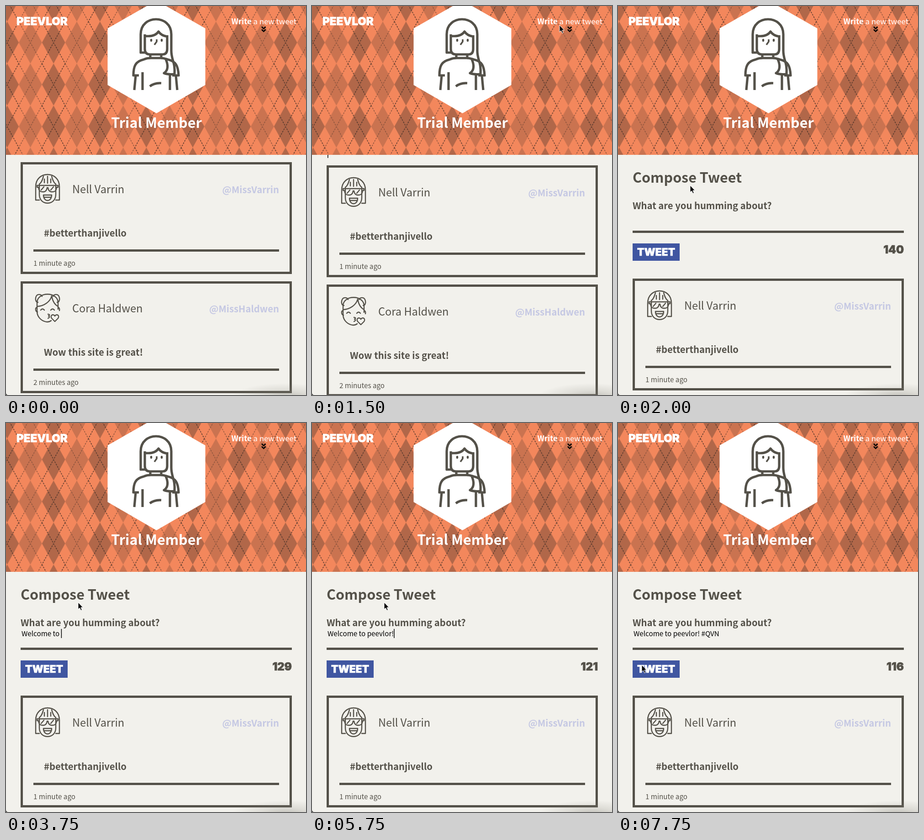
Animation, 657 px wide and 852 px high, one loop 8 s. Source, as an HTML page:

```html
<!DOCTYPE html>
<html lang="en">
<head>
<meta charset="utf-8">
<title>Compose</title>
<style>
  html, body { margin: 0; width: 100%; height: 100%; overflow: hidden; background: #f2f1ec; }
  #stage { display: block; width: 657px; height: 852px; }
  text { font-family: "Noto Sans CJK JP", "Noto Sans CJK SC", "Noto Sans CJK", "Open Sans", sans-serif; fill: #545149; white-space: pre; }
  .light { font-weight: 300; }
  .bold { font-weight: 600; }
  .h1 { font-size: 30.5px; }
  .h2 { font-size: 23.6px; }
  .h3 { font-size: 20.3px; }
  .nav { font-size: 16.8px; }
  .small { font-size: 15.2px; }
  .white { fill: #fff; }
  .handle { fill: #c5c8e3; font-weight: 700; }
  .block { font-family: Inter, Lato, sans-serif; font-weight: 900; stroke: #545149; stroke-width: .7; }
  .block.white { stroke: #fff; }
  .end { text-anchor: end; }
  .mid { text-anchor: middle; }
  .ink { fill: none; stroke: #545149; stroke-linecap: round; stroke-linejoin: round; }
</style>
</head>
<body>
<svg id="stage" viewBox="0 0 657 852">
  <defs>
    <pattern id="argyle" x="2.6" y="34" width="101.6" height="92" patternUnits="userSpaceOnUse" viewBox="0 0 96 92" preserveAspectRatio="none">
      <rect width="96" height="92" fill="#f3875c"/>
      <path d="M48 0L72 46L48 92L24 46Z" fill="#ca7350"/>
      <path d="M0 0L24 46L0 92ZM96 0V92L72 46Z" fill="#b16749"/>
      <g fill="none" stroke-width="1.2" stroke-dasharray="3.4 2.3">
        <path d="M24 0L72 92M72 0L24 92" stroke="#7d4c38"/>
        <path d="M-24 0L24 92M24 0L-24 92M72 0L120 92M120 0L72 92" stroke="#3c2b24"/>
      </g>
    </pattern>
    <radialGradient id="shade">
      <stop offset="0" stop-color="#77756c" stop-opacity=".42"/>
      <stop offset=".5" stop-color="#88867c" stop-opacity=".18"/>
      <stop offset="1" stop-color="#88867c" stop-opacity="0"/>
    </radialGradient>
  </defs>
  <rect width="657" height="852" fill="#f2f1ec"/>

  <g id="feed"></g>

  <svg id="composer" y="326" width="657" height="0" overflow="hidden">
    <g id="form">
      <text x="32" y="387" class="h1 bold">Compose Tweet</text>
      <text x="32" y="445" class="h3 bold">What are you humming about?</text>
      <text id="draft" x="34" y="467" class="small light" style="fill:#000"></text>
      <rect id="caret" y="451" width="1.5" height="20"/>
      <rect x="32" y="492" width="594" height="5" fill="#545149"/>
      <rect x="32" y="520" width="103" height="38" fill="#4056a1"/>
      <text x="83.5" y="547" class="block white mid" font-size="22.5">TWEET</text>
      <text id="count" x="626" y="542" class="block end" font-size="24"></text>
    </g>
  </svg>

  <rect width="657" height="326" fill="url(#argyle)"/>
  <path d="M329.5 -12L436.5 49V173L329.5 235L222.5 173V49Z" fill="#fff"/>
  <g class="ink" stroke-width="5.2" style="stroke-linecap:butt">
    <path d="M304 102H295V62C295 18 362 18 362 62V98C362 118 371 124 369 149C361 150 353 150 346 147C356 141 355 128 350 117"/>
    <path d="M304 62V94Q304 106 315 106H343Q353 106 353 94V64"/>
    <path d="M302 66H312C322 66 330 62 334 56C338 62 345 66 354 67"/>
    <path d="M316 106V114H340V106"/>
    <path d="M291 152H279C279 131 284 121 302 117C308 114 312 114 316 114M340 114C346 114 350 116 354 117C372 121 377 131 378 152H364"/>
    <path d="M284 152L281 184M299 145V184M359 147V184M372 152L375 184M315 176Q325 168 340 169"/>
    <path d="M330 73V78L325 85" stroke-width="3.6"/>
  </g>
  <g fill="#545149"><ellipse cx="318" cy="75" rx="2.3" ry="3.3"/><ellipse cx="341" cy="75" rx="2.3" ry="3.3"/></g>
  <text x="329.5" y="267" class="h1 bold white mid">Trial Member</text>
  <text x="23" y="42" class="block white" font-size="24">PEEVLOR</text>
  <text x="636" y="40" class="nav light white end"><tspan font-weight="600">Write</tspan> a new tweet</text>
  <path d="M560 45.5L564.3 49.7L568.6 45.5M560 51.5L564.3 55.7L568.6 51.5" fill="none" stroke="#000" stroke-width="2.5"/>

  <ellipse cx="612" cy="857" rx="118" ry="31" fill="url(#shade)"/>
  <path d="M0 847Q0 852 5 852H0Z" fill="#222"/>
  <path id="cursor" d="M0 0V15L3.4 12L6 17.5L8.4 16.4L6 11H10.5Z" fill="#000" stroke="#fff" stroke-width="1"/>
</svg>

<script>
const LOOP = 8000, STEP = 250, LIMIT = 140, FORM_HEIGHT = 255;
const MESSAGE = 'Welcome to peevlor! #QVN';
const $ = id => document.getElementById(id);

// Icons share one box near the card's top left corner.
const shades = `
  <path d="M41 82H33V53C33 17 85 17 85 53V82H77"/>
  <path d="M41 47V70C41 95 77 95 77 70V47M41 47C46 44 48 37 50 30M52 44V36M59 45V30M66 44V36M77 47C72 44 70 37 68 30"/>
  <path d="M36 50H82V54H79Q78 64 71 64H67Q61 63 60 55H58Q57 63 51 64H47Q40 64 39 54H36ZM45 60L51 53M66 60L72 53"/>
  <path d="M50 71H68C68 87 50 87 50 71ZM51 76H67"/>`;
const kiss = `
  <path d="M36 46C36 21 82 21 82 46V60M36 46V65C36 78 47 87 58 88Q63 88 67 85"/>
  <path d="M38 45C34 45 32 40 33 35C35 25 45 27 47 32M80 45C84 45 86 40 85 35C83 25 73 27 71 32"/>
  <path d="M37 54C51 53 65 44 68 31C70 42 74 50 82 54M36 56Q32 57 33 62Q34 66 37 66M82 56Q86 57 85 63"/>
  <path d="M44 62Q48 57 52 62M66 62Q70 57 74 62M60 71Q66 72 61 75Q66 77 60 80"/>
  <path d="M75 87L68 80C64 74 71 69 75 75C79 69 86 74 82 80Z"/>`;

function card(y, icon, name, handle, body, age) {
  return `<g transform="translate(0 ${y})">
    <rect x="34.5" y="2.5" width="589" height="240" fill="none" stroke="#545149" stroke-width="5"/>
    <g class="ink" stroke-width="2.4" transform="translate(32 1)">${icon}</g>
    <text x="145" y="68" class="h2 light">${name}</text>
    <text x="598" y="68" class="h3 handle end">${handle}</text>
    <text x="83" y="163" class="h3 bold">${body}</text>
    <rect x="60" y="191" width="538" height="5" fill="#545149"/>
    <text x="60" y="227" class="small light">${age}</text>
  </g>`;
}

$('feed').innerHTML =
  card(342, shades, 'Nell Varrin', '@MissVarrin', '#betterthanjivello', '1 minute ago') +
  card(603, kiss, 'Cora Haldwen', '@MissHaldwen', 'Wow this site is great!', '2 minutes ago');

// Each key is a start time followed by the values held from then on.
const typing = [[0, 0], [2500, 1], [2750, 3], [3000, 5], [3250, 6], [3500, 8], [3750, 11],
  [4250, 12], [4500, 13], [4750, 15], [5000, 17], [5250, 18], [5750, 19],
  [6000, 20], [6250, 21], [6750, 23], [7000, 24]];
const pointer = [[0, -40, -40], [250, 2, 835], [500, 220, 480], [750, 450, 130], [1000, 555, 17],
  [1250, 547, 40], [1500, 542, 42], [1750, 345, 224], [2000, 158, 393], [7500, 96, 474], [7750, 52, 530]];
const held = (keys, t) => keys.filter(k => k[0] <= t).pop().slice(1);

const swing = p => 0.5 - Math.cos(Math.PI * Math.min(1, Math.max(0, p))) / 2;

function render(time) {
  const t = Math.floor(time / STEP) * STEP;
  const open = FORM_HEIGHT * swing((t - 1458) / 400);
  const scroll = Math.min(125, FORM_HEIGHT - open);
  const [typed] = held(typing, t);
  const [x, y] = held(pointer, t);

  $('feed').setAttribute('transform', `translate(0 ${Math.round(open)})`);
  $('composer').setAttribute('height', open);
  $('form').setAttribute('transform', `translate(0 ${-326 - scroll})`);
  $('draft').textContent = MESSAGE.slice(0, typed);
  $('count').textContent = LIMIT - typed;
  $('caret').setAttribute('x', 34 + (typed ? $('draft').getComputedTextLength() : 0));
  const caretOn = t < 2000 || (t >= 2500 && t < 7500);
  $('caret').setAttribute('visibility', caretOn ? 'visible' : 'hidden');
  $('cursor').setAttribute('transform', `translate(${x} ${y})`);
}

const start = performance.now();
function tick() {
  render((performance.now() - start) % LOOP);
  requestAnimationFrame(tick);
}
tick();
</script>
</body>
</html>
```
